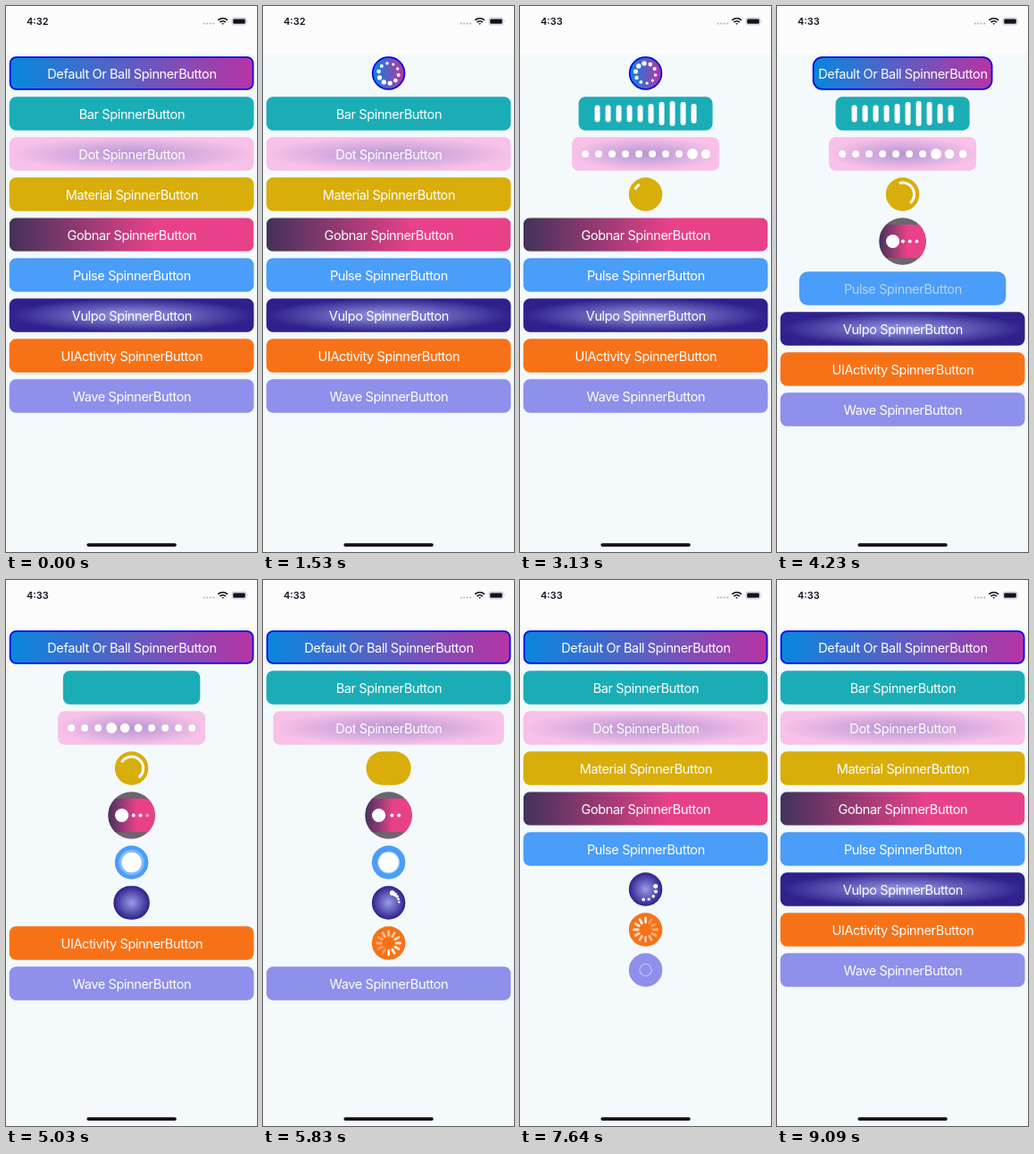
Animation of 281x609 px, one loop 9110 ms. Source, as an HTML page:

```html
<!DOCTYPE html>
<html lang="en">
<head>
<meta charset="utf-8">
<title>Spinner buttons</title>
<style>
html, body { margin: 0; width: 100%; height: 100%; overflow: hidden; background: #f4f9fc; }
svg { display: block; width: 281px; height: 609px; }
text { font-family: Inter, "Liberation Sans", sans-serif; }
.label { font-size: 14.55px; letter-spacing: -.4px; fill: #fff; text-anchor: middle; }
</style>
</head>
<body>
<svg id="stage" viewBox="0 0 281 609">
  <defs>
    <linearGradient id="ballFill"><stop stop-color="#0787de"/><stop offset="1" stop-color="#b833a4"/></linearGradient>
    <linearGradient id="chaseFill"><stop stop-color="#42325a"/><stop offset=".6" stop-color="#e8418a"/><stop offset="1" stop-color="#e8418a"/></linearGradient>
    <radialGradient id="dotFill"><stop stop-color="#b795d5"/><stop offset="1" stop-color="#f7c1e8"/></radialGradient>
    <radialGradient id="orbitFill"><stop stop-color="#999ce8"/><stop offset="1" stop-color="#2e218b"/></radialGradient>
    <clipPath id="chaseClip"><rect/></clipPath>
  </defs>
  <rect width="281" height="609" fill="#f4f9fc"/>
  <rect width="281" height="53" fill="#fcfcfd"/>
  <text id="clock" x="23" y="21" font-size="11" font-weight="600" fill="#17121f">4:32</text>
  <g fill="#b9b7d2">
    <circle cx="221.7" cy="19.6" r="1.1"/><circle cx="225.2" cy="19.6" r="1.1"/>
    <circle cx="228.7" cy="19.6" r="1.1"/><circle cx="232.2" cy="19.6" r="1.1"/>
  </g>
  <g fill="none" stroke="#14101c" stroke-width="1.7">
    <path d="M237.4 15.9a7.6 7.6 0 0 1 10.6 0M239.5 18.1a4.6 4.6 0 0 1 6.4 0"/>
    <path d="M241.3 19.3h2.8l-1.4 1.7z" fill="#14101c" stroke="none"/>
  </g>
  <rect x="253" y="13.3" width="16" height="7.6" rx="2.2" fill="none" stroke="#b4b1c8" stroke-width=".8"/>
  <rect x="254.2" y="14.5" width="13.6" height="5.2" rx="1.2" fill="#14101c"/>
  <path d="M270 15.8q1.3 1.3 0 2.6z" fill="#b4b1c8"/>
  <g id="rows"></g>
  <rect x="90.4" y="599.2" width="100.4" height="3.75" rx="1.9" fill="#140c1c"/>
</svg>
<script>
const LOOP = 9110, FOLD = 300, FULL = 273.75, H = 37.5, CX = 140.6, TOP = 56.25, STEP = 45;
const TAU = Math.PI * 2, RAD = Math.PI / 180;
const clamp = v => Math.max(0, Math.min(1, v));
const ease = v => { v = clamp(v); return v * v * (3 - 2 * v); };
const range = (n, fn) => Array.from({ length: n }, (_, i) => fn(i)).join('');
const dot = (x, y, r, o = 1) =>
  `<circle cx="${x.toFixed(2)}" cy="${y.toFixed(2)}" r="${r.toFixed(2)}" fill="#fff" opacity="${o.toFixed(2)}"/>`;

// Cubic Bezier (.5, y1, .25, 1) solved for x by bisection
function curve(x, y1) {
  let lo = 0, hi = 1, s = 0.5;
  const at = (a, b) => 3 * (1 - s) ** 2 * s * a + 3 * (1 - s) * s * s * b + s ** 3;
  for (let i = 0; i < 18; i++) {
    s = (lo + hi) / 2;
    if (at(0.5, 0.25) < x) lo = s; else hi = s;
  }
  return at(y1, 1);
}

// Each spinner draws around 0,0: t is loop time, u is time since it appeared
const spin = {
  ball(t) {
    const peak = 115 + (t - 1530) * 0.3;
    return range(10, i => {
      const a = i * 36 + 10;
      const k = (1 + Math.cos((a - peak) * RAD)) / 2;
      return dot(11.2 * Math.cos(a * RAD), 11.2 * Math.sin(a * RAD), 1.6 + 1.1 * k);
    });
  },
  bar(t) {
    const peak = ((t - 3130) / 100 + 7 + 24) % 12;
    return range(10, i => {
      let d = Math.abs(i - peak);
      d = Math.min(d, 12 - d);
      const h = 19 + 9 * Math.cos(Math.min(d / 3.2, 1) * Math.PI / 2) ** 2;
      return `<rect x="${(i - 4.5) * 12 - 3}" y="${-h / 2}" width="6" height="${h}" rx="3" fill="#fff"/>`;
    });
  },
  dots(t) {
    const peak = ((t - 3130) / 100 + 8 + 24) % 12;
    return range(10, i => {
      const ahead = (i - peak + 12) % 12;
      const k = Math.max(0, 1 - ahead / 2.6, ahead - 11);
      return dot((i - 4.5) * 15, 0, 4 + 2 * k);
    });
  },
  arc(t, u) {
    const c = u % 1500, turn = Math.floor(u / 1500) * 270;
    const base = -165 + u * 0.24 + turn;
    const a = (base + 270 * ease((c - 750) / 750)) * RAD;
    const b = (base + 30 + 270 * ease(c / 750)) * RAD;
    const p = v => `${13 * Math.cos(v)} ${13 * Math.sin(v)}`;
    return `<path d="M${p(a)}A13 13 0 ${b - a > Math.PI ? 1 : 0} 1 ${p(b)}" fill="none" stroke="#fff" stroke-width="3"/>`;
  },
  chase(t) {
    const k = ((t - 5830) / 450 + 10) % 1;
    return range(3, i => dot(-4 + (i + 1 - k) * 7.8, 0, 2, i === 2 ? clamp(k * 2) : 1)) + dot(-11, 0, 7.6);
  },
  pulse(t, u) {
    const k = (u % 1150) / 1150;
    return dot(0, 0, 11.2 + 6 * k, 0.6 * (1 - k)) + dot(0, 0, 11.2);
  },
  orbit(t) {
    const x = ((t - 5638 + 3200) % 1600) / 1600;
    return range(5, i => {
      const rate = i / 5, p = curve(x, 0.15 + rate);
      const a = p * TAU - Math.PI / 2;
      const size = 1 - rate + (2 * rate - 0.8) * p;
      return dot(11.7 * Math.cos(a), 11.7 * Math.sin(a), 3 * size);
    });
  },
  ticks(t) {
    const lead = 95 + (t - 5830) * 0.3;
    return range(12, i => {
      const lag = ((lead - i * 30) % 360 + 360) % 360;
      return `<rect x="7" y="-1.4" width="7.5" height="2.8" rx="1.4" fill="#fff" opacity="${1 - 0.8 * lag / 360}" transform="rotate(${i * 30})"/>`;
    });
  },
  wave(t, u) {
    const k = (u % 1000) / 1000;
    return `<circle r="${13 * k}" fill="none" stroke="#fff" stroke-width="1.1" opacity="${1 - k}"/>`;
  }
};

const rows = [
  { name: 'Default Or Ball', fill: 'url(#ballFill)', tap: 1040, draw: spin.ball, border: true },
  { name: 'Bar', fill: '#1badb6', tap: 2000, draw: spin.bar, w: 150 },
  { name: 'Dot', fill: 'url(#dotFill)', tap: 2601, draw: spin.dots, w: 165 },
  { name: 'Material', fill: '#d9ad0a', tap: 2788, draw: spin.arc },
  { name: 'Gobnar', fill: 'url(#chaseFill)', tap: 3600, draw: spin.chase, w: 52.5, h: 52.5 },
  { name: 'Pulse', fill: '#4a9df8', tap: 4149, draw: spin.pulse },
  { name: 'Vulpo', fill: 'url(#orbitFill)', tap: 4750, draw: spin.orbit },
  { name: 'UIActivity', fill: '#f77217', tap: 5250, draw: spin.ticks },
  { name: 'Wave', fill: '#8f8fec', tap: 5825, draw: spin.wave, hold: 2960 }
];

const NS = 'http://www.w3.org/2000/svg';
function add(parent, tag, attrs = {}) {
  const el = document.createElementNS(NS, tag);
  set(el, attrs);
  return parent.appendChild(el);
}
function set(el, attrs) {
  for (const k in attrs) el.setAttribute(k, attrs[k]);
}

const clock = document.getElementById('clock');
const clip = document.querySelector('#chaseClip rect');
for (const row of rows) {
  const g = add(document.getElementById('rows'), 'g');
  if (row.h) row.back = add(g, 'rect', { fill: '#6a656e' });
  row.box = add(row.h ? add(g, 'g', { 'clip-path': 'url(#chaseClip)' }) : g, 'rect', { fill: row.fill });
  if (row.border) set(row.box, { stroke: '#0b0be2', 'stroke-width': 1.8 });
  row.label = add(g, 'text', { class: 'label', x: CX + 0.3 });
  row.label.textContent = row.name + ' SpinnerButton';
  row.spinner = add(g, 'g');
}

function render(t) {
  clock.textContent = t < 2330 ? '4:32' : '4:33';
  let y = TOP;
  for (const row of rows) {
    const back = row.tap + (row.hold || 3000);
    const closing = t < back;
    const k = closing ? ease((t - row.tap) / FOLD) : 1 - ease((t - back) / FOLD);
    const small = row.w || H;
    const w = FULL + (small - FULL) * k;
    const h = H + ((row.h || H) - H) * k;
    const round = row.w && !row.h ? 7.5 : 7.5 + ((row.h || H) / 2 - 7.5) * k;
    const mid = y + h / 2, inset = row.border ? 0.9 : 0;
    const shape = {
      x: CX - w / 2 + inset, y: y + inset, rx: round - inset,
      width: w - 2 * inset, height: h - 2 * inset
    };
    if (row.h) {
      set(clip, shape);
      set(row.back, { ...shape, visibility: k > 0 ? 'visible' : 'hidden' });
      set(row.box, { x: shape.x, y: mid - H / 2, width: w, height: H });
    } else {
      set(row.box, shape);
    }
    const shown = closing ? 1 - k * 2.4 : (0.55 - k) * 4;
    set(row.label, { y: mid + 5.5, opacity: clamp(shown) });
    const u = t - row.tap - FOLD;
    row.spinner.innerHTML = u >= 0 && closing ? row.draw(t, u) : '';
    set(row.spinner, { transform: `translate(${CX} ${mid})` });
    y += h + STEP - H;
  }
}

function tick(t) {
  const step = from => from + 100 * Math.floor((t - from) / 100);
  if (t < 1030) return 0;
  if (t >= 9090) return 9090;
  if (t >= 6840) return step(6840);
  if (t >= 3630 && t < 3730) return 3530;
  return Math.min(6530, step(1030));
}

let last = -1;
const begin = performance.now();
function loop() {
  const t = tick((performance.now() - begin) % LOOP);
  if (t !== last) render(last = t);
  requestAnimationFrame(loop);
}
loop();
</script>
</body>
</html>
```
